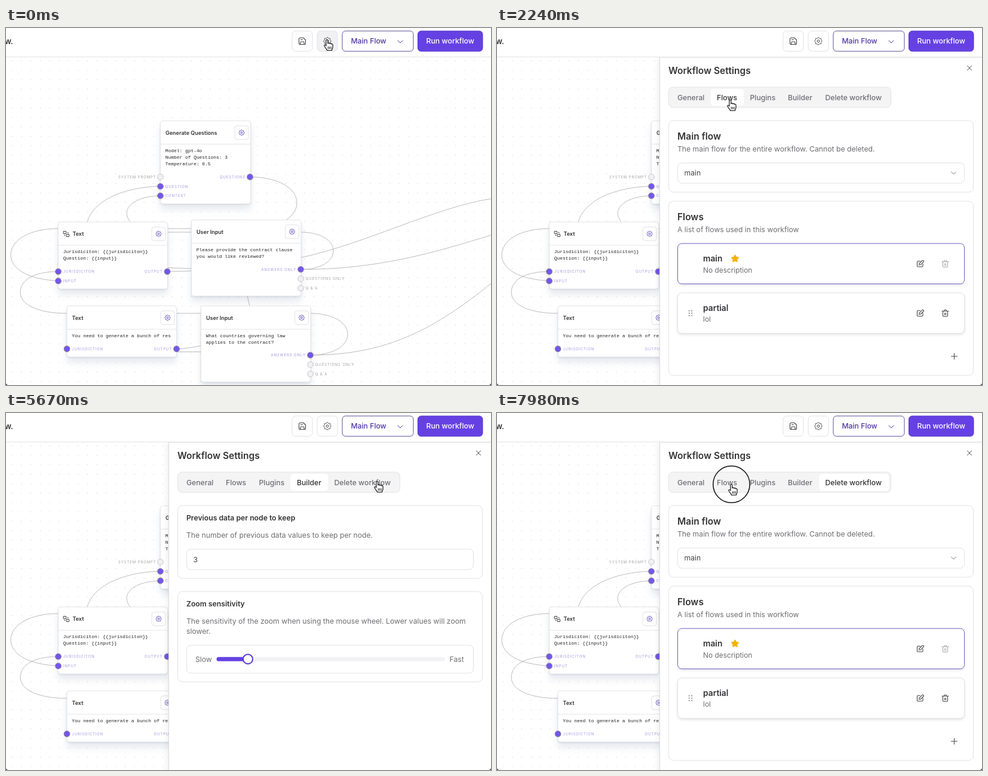
An HTML page for the animation above (8000 ms loop, 812 px wide and 598 px high).

```html
<!DOCTYPE html>
<html lang="en">
<head>
<meta charset="utf-8">
<title>Workflow settings</title>
<style>
html, body { margin: 0; width: 100%; height: 100%; overflow: hidden; background: #fff; }
svg { display: block; width: 100vw; height: 100vh; }
text { font-family: Inter, sans-serif; white-space: pre; }
.mono { font-family: "Liberation Mono", monospace; }
.caps { letter-spacing: .9px; }
.node { filter: drop-shadow(0 1px 1px rgba(50,60,90,.12)) drop-shadow(0 9px 6px rgba(70,90,130,.13)); }
.soft { filter: drop-shadow(0 2px 2px rgba(40,40,70,.13)); }
.sheet { filter: drop-shadow(-2px 0 5px rgba(0,0,0,.07)); }
</style>
</head>
<body>
<svg id="stage" viewBox="0 0 812 598" xmlns="http://www.w3.org/2000/svg"></svg>
<script>
const INK = '#333336', GREY = '#6e6e73', LINE = '#e2e2e6', PURPLE = '#6541e3', DEEP = '#4e35a8';

// ---- drawing helpers ----
const rect = (x, y, x2, y2, r = 6, fill = '#fff', stroke = LINE, more = '') =>
  `<rect x="${x}" y="${y}" width="${x2 - x}" height="${y2 - y}" rx="${r}" fill="${fill}" stroke="${stroke}" ${more}/>`;
const text = (x, y, s, { size = 12.2, w = 400, fill = GREY, end = 'start', cls = '' } = {}) =>
  `<text x="${x}" y="${y}" font-size="${size}" font-weight="${w}" fill="${fill}" text-anchor="${end}" class="${cls}">${s}</text>`;
const line = (d, stroke = INK, width = 1, fill = 'none') =>
  `<path d="${d}" fill="${fill}" stroke="${stroke}" stroke-width="${width}" stroke-linecap="round" stroke-linejoin="round"/>`;
const dot = (x, y, r, fill, stroke = 'none', width = 1) =>
  `<circle cx="${x}" cy="${y}" r="${r}" fill="${fill}" stroke="${stroke}" stroke-width="${width}"/>`;
const polar = (x, y, n, radius) => 'M' + Array.from({ length: n }, (_, i) => {
  const a = i / n * 2 * Math.PI - Math.PI / 2, r = radius(i, a);
  return (x + r * Math.cos(a)).toFixed(2) + ' ' + (y + r * Math.sin(a)).toFixed(2);
}).join('L') + 'Z';

const head = (y, s) => text(302, y, s, { size: 15.5, w: 600, fill: INK });
const label = (x, y, s, w = 500) => text(x, y, s, { w, fill: INK });
const note = (x, y, s) => text(x, y, s);
const card = (y, y2) => rect(287.5, y, 797.5, y2, 8);
const box = (y, y2, stroke, more) => rect(302.5, y, 782.5, y2, 7, '#fff', stroke, more);
const gear = (x, y, s, color) =>
  line(polar(x, y, 64, (i, a) => s * (1 + .13 * Math.cos(8 * a))), color) + dot(x, y, s * .36, 'none', color);
const chevron = (x, y, color) => line(`M${x - 4} ${y - 2}l4 4l4 -4`, color);
const edit = (x, y) => line(`M${x} ${y - 4.5}h-3.5q-1.5 0 -1.5 1.5v6.5q0 1.5 1.5 1.5h6.5q1.5 0 1.5 -1.5v-3.5` +
  `M${x - 2} ${y + 2}l.5 -2.5l5 -5q1.2 -.6 2 .2t.2 2l-5 5z`, '#444', 1.1);
const trash = (x, y, color) => line(`M${x - 5.5} ${y - 3.5}h11m-9.5 0v7.5q0 1.5 1.5 1.5h5q1.5 0 1.5 -1.5v-7.5` +
  `m-6 0v-1q0 -1 1 -1h2q1 0 1 1v1m-3 3v3.5m2 -3.5v3.5`, color, 1.1);

// ---- workflow canvas ----
const port = (x, y, name, side, on = true) => {
  const [dx, end] = { in: [8.3, 'start'], out: [-7.5, 'end'], before: [-7, 'end'] }[side];
  return dot(x, y, 4.8, on ? '#7453f6' : '#f1f1f3', on ? '#85829a' : '#c4c4c8', on ? 1.2 : 1) +
    text(x + dx, y + 2.2, name, { size: 6, fill: on ? '#a598dd' : '#a3a3a8', end, cls: 'caps' });
};
const node = (x, y, x2, y2, title, lines, icon = false) => {
  const gx = x2 - 15, gy = y + 19.8;
  return `<g class="node">${rect(x, y, x2, y2, 4, '#fff', '#e6e6ea')}</g>` +
    line(`M${x} ${y + 39}H${x2}`, '#e6e6ea') +
    text(x + (icon ? 24 : 8.5), y + 23, title, { size: 9, w: 600, fill: INK }) +
    rect(gx - 11.5, gy - 11.5, gx + 11.5, gy + 11.5, 4) + gear(gx, gy, 4.1, '#5a46b4') +
    (icon ? line(`M${x + 9} ${y + 15.5}h4v4h-4zM${x + 14} ${y + 20.5}h4v4h-4zM${x + 15.5} ${y + 17.5}h1v1M${x + 10.5} ${y + 21.5}v1h1`, '#444') : '') +
    lines.map((s, i) => text(x + 8.3, y + 52 + i * 11, s, { size: 7.9, fill: '#222', cls: 'mono' })).join('');
};
const answers = (x, y) => port(x, y, 'ANSWERS ONLY', 'out') +
  port(x, y + 15.8, 'QUESTIONS ONLY', 'in', false) + port(x, y + 31.6, 'Q &amp; A', 'in', false);

let grid = '';
for (let y = 55; y < 598; y += 15.8) for (let x = 10; x < 812; x += 15.8) grid += `M${x.toFixed(1)} ${y.toFixed(1)}h0`;

const edges = [
  'M258 265C190 267 145 292 136 325', 'M258 281C215 282 190 302 208 325',
  'M409 249.5C455 249.5 487 268 487 293C487 304 480 314 470 321',
  'M87 423.5C35 421 8 403 8 380C8 355 40 336 87 336H310',
  'M87 408C50 408 24 420 24 443C24 464 55 478 102 478H327',
  'M271 342H494C525 342 548 355 548 373C548 392 525 404.5 494 404.5',
  'M510 478C545 478 572 492 572 513C572 534 545 548 510 548',
  'M271 401.5L310 403', 'M271 408L310 407', 'M286 537.5C300 537 314 535 327 532', 'M286 542.5H327',
  'M494 384.5C600 362 720 300 812 286', 'M494 404.5C620 404.5 715 377 812 347',
  'M510 548C640 548 720 502 812 428', 'M404 449L408 466'
].join('');

const board = line(grid, '#d0d0d6', 1.3) + line(edges, '#bcbcc0') +
  node(258.5, 155.5, 409.5, 294.5, 'Generate Questions', ['Model: gpt-4o', 'Number of Questions: 3', 'Temperature: 0.5']) +
  port(258.5, 249.5, 'SYSTEM PROMPT', 'before', false) + port(258.5, 265.3, 'QUESTION', 'in') +
  port(258.5, 281, 'CONTEXT', 'in') + port(408.5, 249.5, 'QUESTIONS', 'out') +
  node(87.5, 325, 270.5, 437, 'Text', ['Jurisdiciton: {{jurisdiciton}}', 'Question: {{input}}'], true) +
  port(87.5, 408, 'JURISDICITON', 'in') + port(87.5, 423.7, 'INPUT', 'in') + port(270, 408, 'OUTPUT', 'out') +
  node(310.5, 321.5, 494, 449, 'User Input', ['Please provide the contract clause', 'you would like reviewed?']) +
  answers(493.5, 404.3) +
  node(102, 465.5, 285.5, 551, 'Text', ['You need to generate a bunch of res']) +
  port(102, 537.5, 'JURISDICTION', 'in') + port(285.5, 537.5, 'OUTPUT', 'out') +
  node(326.5, 465.5, 510, 593, 'User Input', ['What countries governing law', 'applies to the contract?']) +
  answers(509.5, 548);

// ---- top bar ----
const bar = rect(-1, -1, 813, 48.5, 0) +
  text(12, 27, 'New test workflow.', { size: 13, w: 600, fill: INK, end: 'end' }) +
  rect(479, 5, 513, 39) +
  line('M492.5 16.5h5.5l3.5 3.5v5.5q0 2 -2 2h-7q-2 0 -2 -2v-7q0 -2 2 -2zM493 27.3v-3.3q0 -1 1 -1h4q1 0 1 1v3.3M493.5 19.5h3', '#444', 1.1) +
  rect(521, 5, 555, 39, 6, '#fff', LINE, 'id="gearButton"') + gear(538, 22, 5.6, '#444') +
  rect(563, 5, 682, 39, 5.5, '#fff', '#5a4c93') +
  text(577.5, 26.3, 'Main Flow', { w: 500, fill: DEEP }) + chevron(660, 23, DEEP) +
  rect(689.5, 5, 798, 39, 5.5, PURPLE, '#5534c9') +
  text(703.5, 26.3, 'Run workflow', { size: 12.3, w: 500, fill: '#fff' });

// ---- panes ----
const general = card(155, 495.5) + head(185, 'General Settings') +
  note(302, 205.5, 'General workflow settings like name and description.') + box(224.5, 480.5) +
  label(317, 255, 'Workflow name') + rect(317.5, 267.5, 767.5, 301.5) +
  text(328.5, 289.3, 'New test workflow.', { fill: '#444' }) +
  label(317, 332, 'Workflow description') +
  note(317, 357.3, 'A description of the workflow. This will be displayed on the published workflow') +
  note(317, 374.6, 'card so be informative.') + rect(317.5, 386.8, 767.5, 465.5) +
  text(328.5, 407.3, 'This is a new test workflow', { fill: '#444' }) + line('M758.5 464l7 -7M762.5 464l3 -3', '#555');

const flowItem = (y, name, about, active) => box(y, y + 67.6, active ? '#7161bd' : LINE, 'class="soft"') +
  text(345, y + 30, name, { size: 13.8, w: 600, fill: INK }) + text(345, y + 48.5, about, { size: 11.9 }) +
  edit(708.5, y + 34) + trash(750.5, y + 34, active ? '#aaa' : '#444');
const flows = card(155, 275) + head(187, 'Main flow') +
  note(302, 207, 'The main flow for the entire workflow. Cannot be deleted.') + box(226, 260) +
  text(313.5, 247.3, 'main', { fill: '#444' }) + chevron(764.5, 243, '#777') +
  card(290, 582) + head(322, 'Flows') + note(302, 342, 'A list of flows used in this workflow') +
  flowItem(361, 'main', 'No description', true) + flowItem(443.8, 'partial', 'lol', false) +
  line(polar(398.5, 386.5, 10, i => i % 2 ? 3.2 : 6), '#f3b10c', 1.6, '#f3b10c') +
  [0, 1, 2, 3, 4, 5].map(i => dot(321.7 + i % 2 * 4.6, 473.7 + (i >> 1) * 4, .9, '#666')).join('') +
  line('M760.5 550h10M765.5 545v10', '#444');

const plugin = (y, name, color, lines, nameY) => box(y, y + 69, LINE, 'class="soft"') +
  rect(317.5, y + 17.5, 351.5, y + 51.5, 6, '#fff', LINE, 'class="soft"') + dot(334.5, y + 34.7, 9.5, color) +
  text(366, nameY, name, { size: 13.6, w: 600, fill: INK }) +
  lines.map((s, i) => text(366, nameY + 16.7 + i * 14, s, { size: 10.3 })).join('') +
  rect(689.5, y + 17.5, 767.5, y + 51.5, 6, '#fff', DEEP) +
  text(728.5, y + 39, 'Connect', { w: 500, fill: DEEP, end: 'middle' });
const plugins = card(155, 527) + head(187, 'Plugins') +
  note(302, 210.6, 'A list of plugins integrated into this workflow') +
  text(302, 263, 'Not connected', { w: 600 }) +
  plugin(282, 'Y-Lett', '#e2473a', ['Draft, send and search for e-mails in your workflows', 'using Y-Lett.'], 307) +
  plugin(359, 'Dealfern', '#e8713a', ['Search your Dealfern CRM for contacts and companies.'], 391.3) +
  plugin(436, 'Ormelo Shelf', '#23a45a', ['Access files in your Ormelo Shelf for use in our template', 'builder and within your workflows.'], 461);

const builder = card(155, 277) + label(302, 180, 'Previous data per node to keep', 600) +
  note(302, 209, 'The number of previous data values to keep per node.') + box(228, 262.3) +
  text(313.5, 249.5, '3', { fill: '#444' }) +
  card(299, 450.5) + label(302, 324.3, 'Zoom sensitivity', 600) +
  note(302, 353, 'The sensitivity of the zoom when using the mouse wheel. Lower values will zoom') +
  note(302, 370.3, 'slower.') + box(389, 435.8) + note(317, 416.5, 'Slow') + note(742.5, 416.5, 'Fast') +
  rect(352.5, 408.7, 735, 415.7, 3.5, '#f2f2f4', 'none') + rect(352.5, 408.7, 405, 415.7, 3.5, PURPLE, 'none') +
  dot(405, 412.2, 8, '#fff', '#5938cc', 2);

const remove = card(155, 377) + head(185, 'Delete Workflow') +
  note(302, 205.5, 'Permanently delete this workflow and all its data.') + box(224.5, 362, '#c2474f') +
  label(317, 252, 'Type "Delete New test workflow." to confirm:') + rect(317.5, 264, 767.5, 298) +
  text(328.5, 285.8, 'Delete New test workflow.', { fill: '#77777c' }) +
  rect(317, 313, 768, 347.5, 6, '#fca4a5', 'none') +
  text(542.5, 334.6, 'Delete New test workflow.', { w: 500, fill: '#fff', end: 'middle' });

const tabs = [['General', 302], ['Flows', 368], ['Plugins', 423.5], ['Builder', 487], ['Delete workflow', 549.5]];
const tabEdge = [291, 358, 413.3, 476.5, 539.3, 656];
const sheet = `<g id="sheet" class="sheet">` + rect(272.5, 49, 820, 610, 0, '#fff', '#dcdce0') +
  text(287, 77.3, 'Workflow Settings', { size: 15.5, w: 600, fill: INK }) +
  line('M787.3 63.3l7.4 7.4m0 -7.4l-7.4 7.4', '#555') +
  rect(287.5, 99, 659.5, 133, 7, '#f4f4f5', '#e3e3e6') + rect(0, 102, 1, 130.5, 5, '#fff', 'none', 'id="pill"') +
  tabs.map(([s, x]) => `<g class="tab">${text(x, 120.7, s, { w: 500, fill: 'inherit' })}</g>`).join('') +
  [general, flows, plugins, builder, remove].map(p => `<g class="pane">${p}</g>`).join('') + '</g>';

// ---- pointer, with its hot spot at 0,0 ----
const hand = line('M-1.6 1.4C-1.6 -.5 1.4 -.5 1.4 1.4V6.4C1.7 5.2 4.2 5.2 4.4 6.8C5 5.8 7 6 7.2 7.5C8 6.8 9.6 7 9.6 8.7' +
  'V12.5C9.6 15 8.2 15.5 8 18H.2C-.6 15.6 -4 12.6 -4.6 10.4C-5 8.7 -3.2 8.4 -1.6 10.4Z', '#111', 1.2, '#fff') +
  line('M1.8 12v3.4M4.2 12v3.4M6.6 12v3.4', '#111');
const arrow = '<path d="M0 0V13.2L3 10.4L5.2 15.4L7.6 14.4L5.4 9.6H9.6Z" stroke="#fff" stroke-width="1.6" paint-order="stroke"/>';

const $ = id => document.getElementById(id);
$('stage').innerHTML = board + sheet + bar +
  '<path d="M0 594V598H4Q0 598 0 594M812 594V598H808Q812 598 812 594" fill="#222"/>' +
  '<circle id="ring" fill="none" stroke="#111" stroke-width="1.5"/>' +
  `<g id="pointer"><g id="hand">${hand}</g><g id="arrow">${arrow}</g></g>`;
const panes = document.querySelectorAll('.pane'), labels = document.querySelectorAll('.tab');

// ---- timeline ----
const LOOP = 8000, STEP = 70;
const clicks = [[2100, 1], [3430, 2], [4970, 3], [6370, 4], [7910, 1]]; // time, tab
const stops = [ // time, x, y
  [0, 537.5, 19.5], [1120, 537.5, 20.5], [1750, 390.5, 120.5], [3010, 390.5, 120.5], [3360, 436.5, 121],
  [3850, 436.5, 121], [4480, 507.5, 115], [5040, 507.5, 115], [5670, 621.5, 114.5], [6440, 621.5, 114.5],
  [7140, 400, 118.5], [7280, 393, 119.5], [7420, 392.5, 119.5], [LOOP, 392.5, 119.5]
];
const clamp = v => Math.min(1, Math.max(0, v));
const smooth = v => v * v * (3 - 2 * v);
const shown = t => clicks.reduce((tab, [at, next]) => t >= at ? next : tab, 0);

function draw(time) {
  const t = Math.floor(time / STEP) * STEP;

  const p = clamp((t - 35) / 520);
  $('sheet').setAttribute('transform', `translate(${(550 * (1 - smooth(1 - (1 - p) ** 1.6))).toFixed(2)})`);
  $('gearButton').setAttribute('fill', t < STEP ? '#f1f1f3' : '#fff');

  const pane = shown(t - STEP), tab = shown(t - 2 * STEP);
  panes.forEach((g, i) => g.style.display = i === pane ? '' : 'none');
  labels.forEach((g, i) => g.setAttribute('fill', i === tab ? INK : GREY));
  labels.forEach(g => g.firstChild.removeAttribute('fill'));
  $('pill').setAttribute('x', tabEdge[tab]);
  $('pill').setAttribute('width', tabEdge[tab + 1] - tabEdge[tab]);

  const i = stops.findIndex(s => s[0] > t), [t0, x0, y0] = stops[i - 1], [t1, x1, y1] = stops[i];
  const k = smooth((t - t0) / (t1 - t0)), x = x0 + (x1 - x0) * k, y = y0 + (y1 - y0) * k;
  $('pointer').setAttribute('transform', `translate(${x.toFixed(2)} ${y.toFixed(2)})`);
  const pointing = t < STEP || y > 99;
  $('hand').style.display = pointing ? '' : 'none';
  $('arrow').style.display = pointing ? 'none' : '';

  const age = clicks.map(c => t - c[0]).find(a => a >= 0 && a < 2 * STEP);
  const ring = $('ring');
  ring.style.display = age === undefined ? 'none' : '';
  ring.setAttribute('cx', x);
  ring.setAttribute('cy', y);
  ring.setAttribute('r', age ? 30.7 : 24);
}

function frame() {
  draw(performance.now() % LOOP);
  requestAnimationFrame(frame);
}
frame();
</script>
</body>
</html>
```
